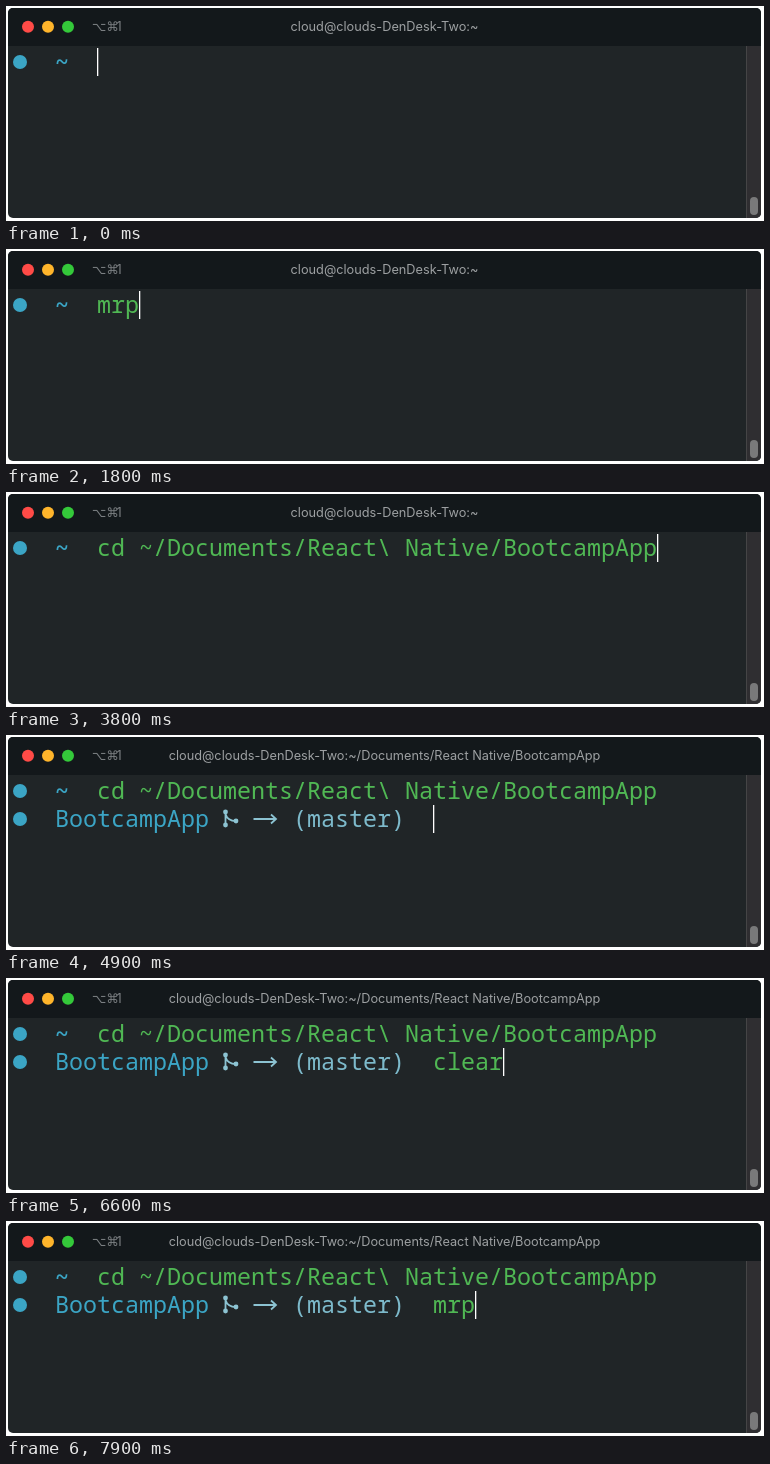
Animation of 758 by 215 pixels, one loop 8 s. Source, as an HTML page:

```html
<!DOCTYPE html>
<html lang="en">
<head>
<meta charset="utf-8">
<title>Shell history</title>
<style>
  html, body { margin: 0; width: 100%; height: 100%; overflow: hidden; background: #fff; }
  svg { display: block; }
  text { white-space: pre; }
  .bar { font: 12.75px Inter, "Liberation Sans", sans-serif; fill: #9da0a2; }
  .keys { font: 12.5px "DejaVu Sans", sans-serif; }
  .hint { fill: #7b7f82; }
  .term { font: 23.33px "Noto Sans Mono", "DejaVu Sans Mono", monospace; }
  .cmd { fill: #50b854; }
  .dir { fill: #3ba5c5; }
  .home { font-weight: 600; }
  .git { fill: #7dbacb; }
  .line { fill: none; stroke: #8cc3d2; stroke-width: 1.8; }
</style>
</head>
<body>
<svg width="758" height="215" viewBox="0 0 758 215">
  <defs><clipPath id="window"><rect x="2" y="2" width="753" height="210" rx="5"/></clipPath></defs>
  <g clip-path="url(#window)">
    <rect width="758" height="215" fill="#202527"/>
    <rect width="758" height="40" fill="#13181b"/>
    <rect x="740" y="40" width="18" height="175" fill="#2f2e31"/>
    <path d="M740.5 40V215" stroke="#454546"/>
    <rect x="744" y="191" width="8" height="18" rx="4" fill="#79797a"/>
  </g>
  <circle cx="22" cy="20.7" r="6" fill="#ff4b47"/>
  <circle cx="42" cy="20.7" r="6" fill="#ffb52b"/>
  <circle cx="62" cy="20.7" r="6" fill="#34c93a"/>
  <text class="keys hint" x="86" y="25">⌥⌘</text>
  <g class="bar">
    <text class="hint" x="110.5" y="25" style="fill:#7b7f82">1</text>
    <text id="title" x="378.5" y="25" text-anchor="middle"></text>
  </g>

  <g class="term">
    <circle class="dir" cx="14" cy="56" r="7"/>
    <text class="dir home" x="49" y="64">~</text>
    <text class="cmd" id="first" x="91" y="64"></text>
    <g id="repo">
      <circle class="dir" cx="14" cy="84" r="7"/>
      <text class="dir" x="49" y="92">BootcampApp</text>
      <g class="line">
        <path d="M219.5 77V90M219.5 79C221 84 225 86 230 86"/>
        <path d="M247.5 84H270M265 79.5L270 84L265 88.5"/>
      </g>
      <g fill="#8cc3d2">
        <circle cx="219.5" cy="77" r="2.4"/>
        <circle cx="219.5" cy="90" r="2.4"/>
        <circle cx="230" cy="86" r="2.4"/>
      </g>
      <text class="git" x="287" y="92">(master)</text>
      <text class="cmd" id="second" x="427" y="92"></text>
      <text class="cmd" id="wrapped" x="7" y="120"></text>
    </g>
  </g>
  <rect id="cursor" width="1.3" height="28" fill="#fff"/>
</svg>
<script>
const LOOP = 8000, CELL = 14, LINE = 28, ENTER = 4400;
const HEAD = "cd ~/Documents/React\\", TAIL = "Native/BootcampApp";
const CD = HEAD + " " + TAIL;
const HOST = "cloud@clouds-DenDesk-Two:~";

// Commands recalled from history, by the time each appears
const history = [
  [0, ""], [800, "clear"], [1500, "mrp"], [2900, CD],
  [ENTER, ""], [5300, CD], [6300, "clear"], [7200, "mrp"]
];

const el = id => document.getElementById(id);
const setText = (id, value) => {
  if (el(id).textContent !== value) el(id).textContent = value;
};

function draw(now) {
  const t = now % LOOP;
  const inRepo = t >= ENTER;
  const command = history.findLast(([start]) => start <= t)[1];
  const wraps = inRepo && command === CD;

  setText("title", HOST + (inRepo ? "/Documents/React Native/BootcampApp" : ""));
  setText("first", inRepo ? CD : command);
  setText("second", !inRepo ? "" : wraps ? HEAD : command);
  setText("wrapped", wraps ? TAIL : "");
  el("repo").style.display = inRepo ? "" : "none";

  const left = wraps ? 7 : inRepo ? 427 : 91;
  const typed = wraps ? TAIL : command;
  el("cursor").setAttribute("x", left + typed.length * CELL);
  el("cursor").setAttribute("y", 42 + LINE * (wraps ? 2 : inRepo ? 1 : 0));
}

const start = performance.now();
function tick() {
  draw(performance.now() - start);
  requestAnimationFrame(tick);
}
tick();
</script>
</body>
</html>
```
